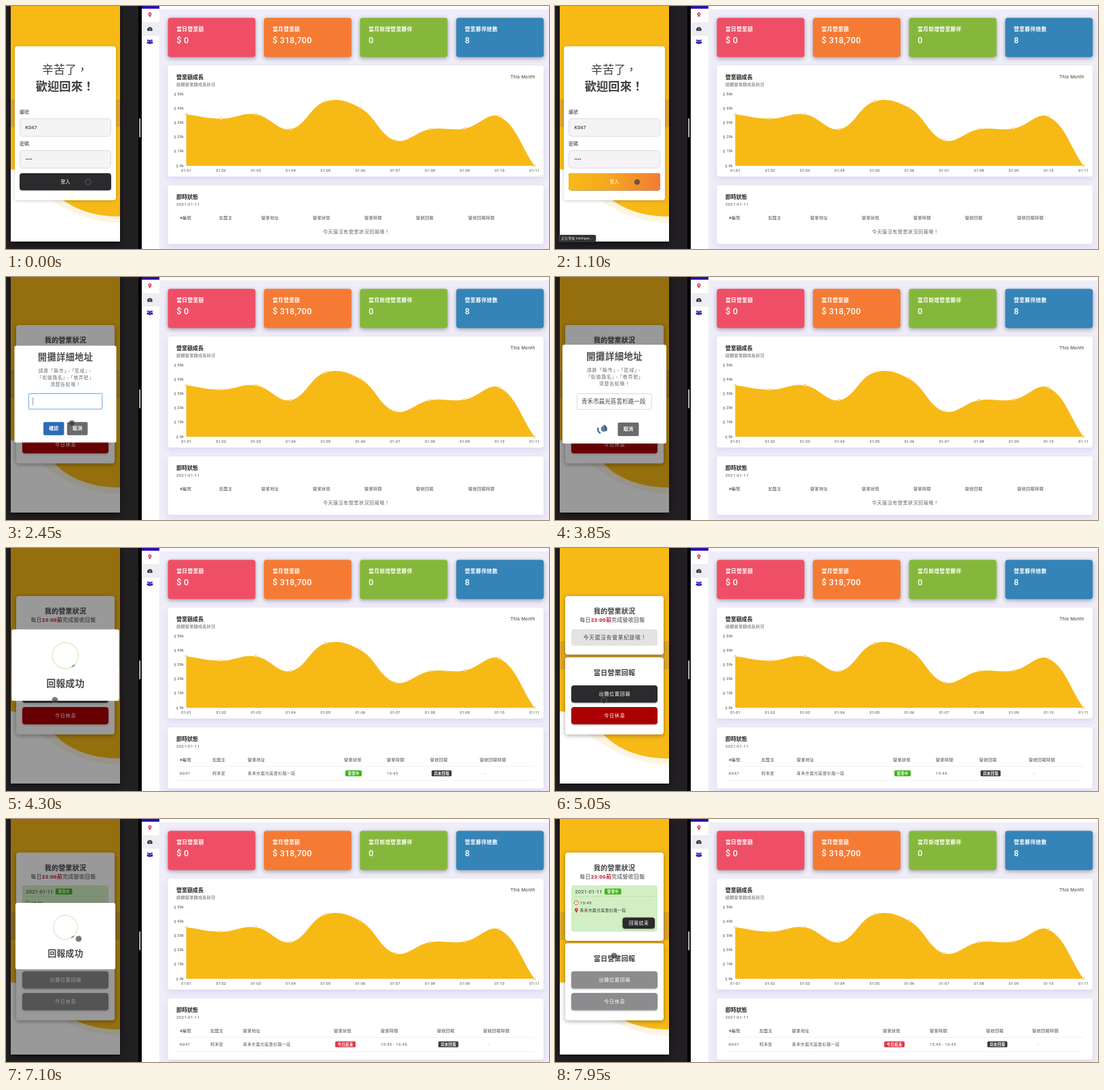
An HTML page with a canvas that plays this animation: 800 px wide and 359 px high, repeating every 8 s.

```html
<!DOCTYPE html>
<html lang="zh-Hant">
<head>
<meta charset="utf-8">
<title>營業回報</title>
<style>
html, body { margin: 0; width: 100%; height: 100%; overflow: hidden; background: #000; }
canvas { display: block; width: 800px; height: 359px; }
</style>
</head>
<body>
<canvas id="stage"></canvas>
<script>
const LOOP = 8000;
const FONT = 'Roboto, "Noto Sans CJK TC", "Noto Sans CJK JP", "Noto Sans CJK", sans-serif';
const MEMBER = { id: 'K047', name: '柯禾安', address: '青禾市晨光區雲杉路一段' };
const DARK = '#2b2a2c', YELLOW = '#f7b916', INK = '#3f3e42';

// moments of the story in ms
const T = {
  press: 500, status: 650, home: 1700, statusEnd: 1800,
  ask: 2174, paste: 2900, send: 3500, open: 4050, done: 4150, doneEnd: 4850,
  report: 5400, closed: 6900, done2: 7000, done2End: 7740
};
const PATH = [[0, 121, 260], [1700, 121, 260], [2120, 97, 216], [2500, 97, 216], [3350, 72, 224],
  [5150, 72, 225], [6450, 123, 154], [6850, 123, 154], [7100, 107, 177], [7900, 87, 202], [8000, 87, 202]];

const canvas = document.getElementById('stage');
const dpr = window.devicePixelRatio || 1;
canvas.width = 800 * dpr;
canvas.height = 359 * dpr;
const c = canvas.getContext('2d');

const clamp = (v, a = 0, b = 1) => Math.min(b, Math.max(a, v));
const mix = (a, b, k) => a + (b - a) * k;

function rect(x1, y1, x2, y2, fill) {
  c.fillStyle = fill;
  c.fillRect(x1, y1, x2 - x1, y2 - y1);
}

function box(x1, y1, x2, y2, fill, r = 4, stroke) {
  c.beginPath();
  c.roundRect(x1, y1, x2 - x1, y2 - y1, r);
  c.fillStyle = fill;
  c.fill();
  if (stroke) {
    c.shadowColor = 'transparent';
    c.strokeStyle = stroke;
    c.lineWidth = 1;
    c.stroke();
  }
}

function shadowBox(x1, y1, x2, y2, fill, shade, blur, dy) {
  c.save();
  c.shadowColor = shade;
  c.shadowBlur = blur * dpr;
  c.shadowOffsetY = dy * dpr;
  box(x1, y1, x2, y2, fill);
  c.restore();
}

function text(s, x, y, size, color, { weight = 400, align = 'left', gap = 0 } = {}) {
  c.font = `${weight} ${size}px ${FONT}`;
  c.letterSpacing = gap + 'px';
  c.textAlign = align;
  c.textBaseline = 'middle';
  c.fillStyle = color;
  c.fillText(s, align === 'center' ? x + gap / 2 : x, y);
}

const mid = (s, x, y, size, color, weight = 400, gap = 0) =>
  text(s, x, y, size, color, { weight, gap, align: 'center' });

function dot(x, y, r, fill) {
  c.beginPath();
  c.arc(x, y, r, 0, 7);
  c.fillStyle = fill;
  c.fill();
}

function arc(x, y, r, from, to, color, width) {
  c.beginPath();
  c.arc(x, y, r, from, to);
  c.strokeStyle = color;
  c.lineWidth = width;
  c.stroke();
}

function pin(x, y, s, color, hole) {
  c.beginPath();
  c.arc(x, y - s * 0.3, s * 0.7, Math.PI * 0.9, Math.PI * 2.1);
  c.lineTo(x, y + s * 1.1);
  c.fillStyle = color;
  c.fill();
  dot(x, y - s * 0.3, s * 0.26, hole);
}

// ---------- dashboard ----------

const VALUES = [160, 166.5, 160, 182, 141, 150.5, 198.5, 182, 181, 163.5, 236];
const POINTS = VALUES.map((y, i) => ({ x: 265.5 + 51.3 * i, y }));

// control points of a cardinal spline weighted by segment length
const HANDLES = POINTS.map((p, i) => {
  const a = POINTS[i - 1] || p, b = POINTS[i + 1] || p;
  const d1 = Math.hypot(p.x - a.x, p.y - a.y), d2 = Math.hypot(b.x - p.x, b.y - p.y);
  const k1 = 0.4 * d1 / (d1 + d2), k2 = 0.4 * d2 / (d1 + d2);
  const dx = b.x - a.x, dy = b.y - a.y;
  const cap = y => clamp(y, 130, 236);
  return { x1: p.x - k1 * dx, y1: cap(p.y - k1 * dy), x2: p.x + k2 * dx, y2: cap(p.y + k2 * dy) };
});

function chart() {
  const shade = 'rgba(90,70,190,.13)';
  shadowBox(238.5, 88, 792, 252, '#fff', shade, 10, 4);
  text('營業額成長', 251, 105.5, 8, '#222', { weight: 700 });
  text('總體營業額成長狀況', 251, 116, 6.2, '#666', { gap: 0.2 });
  text('This Month', 779.5, 105.5, 6.4, '#333', { align: 'right', gap: 0.4 });
  for (let i = 0; i <= 5; i++)
    text(`$ ${i}${i ? 0 : ''}k`, 262, 236 - i * 21.2, 5.3, '#444', { align: 'right', gap: 0.3 });

  c.beginPath();
  c.moveTo(POINTS[0].x, 236);
  c.lineTo(POINTS[0].x, POINTS[0].y);
  for (let i = 1; i < POINTS.length; i++) {
    const a = HANDLES[i - 1], b = HANDLES[i];
    c.bezierCurveTo(a.x2, a.y2, b.x1, b.y1, POINTS[i].x, POINTS[i].y);
  }
  c.fillStyle = YELLOW;
  c.fill();
  POINTS.forEach((p, i) => {
    dot(p.x, p.y, 1.5, '#fff8e0');
    arc(p.x, p.y, 1.5, 0, 7, '#efb526', 0.7);
    mid('01-' + String(i + 1).padStart(2, '0'), p.x, 243, 5.3, '#444', 400, 0.3);
  });
}

const HEADS = ['#編號', '加盟主', '營業地址', '營業狀態', '營業時間', '營收回報', '營收回報時間'];
const COLUMNS = [
  [256, 314, 376, 452, 528, 604, 681],
  [256, 304, 356, 498, 561, 625, 698],
  [256, 301, 349, 483, 552, 635, 703]
];

function tag(s, x, w, y, color) {
  box(x, y - 4.5, x + w, y + 4.2, color, 1.5);
  mid(s, x + w / 2, y, 5.2, '#fff', 700, 0.5);
}

function table(stage) {
  const x = COLUMNS[stage];
  shadowBox(238.5, 265, 792, stage ? 355.5 : 351.5, '#fff', 'rgba(90,70,190,.13)', 10, 4);
  text('即時狀態', 251, 282.5, 8, '#222', { weight: 700 });
  text('2021-01-11', 251, 293, 6.2, '#555', { gap: 0.3 });
  HEADS.forEach((h, i) => text(h, x[i], 313, 6.2, '#4a4a52', { weight: 500, gap: 0.3 }));
  if (!stage) {
    mid('今天還沒有營業狀況回報哦！', 516, 334, 7, '#666', 400, 0.6);
    return;
  }
  rect(251, 322.5, 779, 323, '#e4e4ea');
  rect(251, 343.5, 779, 344, '#e4e4ea');
  const cell = (s, i, dx = 0) => text(s, x[i] + dx, 333, 6.1, '#555', { gap: 0.3 });
  cell(MEMBER.id, 0);
  cell(MEMBER.name, 1);
  cell(MEMBER.address, 2);
  if (stage === 1) tag('營業中', x[3] + 2, 24, 333, '#3db617');
  else tag('今日結束', x[3] + 2, 30, 333, '#e2384c');
  cell(stage === 1 ? '15:45' : '15:45 - 15:45', 4);
  tag('尚未回報', x[5] + 2, 29.5, 333, '#3c3c40');
  cell('-', 6, 7);
}

function sidebar() {
  rect(200, 0, 226, 359, '#fff');
  rect(200, 0, 226, 4, '#2a0fae');
  rect(200, 24, 226, 44, '#eeedf4');
  pin(212, 13, 3.6, '#e33a50', '#fff');
  c.beginPath();
  c.arc(212, 35, 3.8, Math.PI * 0.85, Math.PI * 2.15);
  c.closePath();
  c.fillStyle = '#39383f';
  c.fill();
  rect(211.7, 32.5, 212.4, 36, '#eeedf4');
  for (const dx of [-2.7, 0, 2.7]) {
    const up = dx ? -0.8 : 0;
    dot(212 + dx, 51.6 + up, dx ? 1.2 : 1.6, '#2d1cb5');
    box(210.3 + dx, 53.2 + up, 213.7 + dx, 56.2 + up, '#2d1cb5', 1.2);
  }
}

function dashboard(t) {
  rect(226, 0, 800, 359, '#efedf8');
  rect(226, 0, 800, 5, '#fbfbfe');
  sidebar();
  [
    [238.5, '#ef4f66', '當日營業額', '$ 0'],
    [380, '#f57b35', '當月營業額', '$ 318,700'],
    [521.5, '#85b83a', '當月新增營業夥伴', '0'],
    [663.3, '#3484b7', '營業夥伴總數', '8']
  ].forEach(([x, color, label, value]) => {
    shadowBox(x, 17.5, x + 129, 75.5, color, 'rgba(40,40,60,.4)', 6, 2);
    text(label, x + 12.7, 34.5, 7.7, '#fff', { weight: 700, gap: 0.4 });
    text(value, x + 12.7, 51.5, 12.6, '#fff', { weight: 500, gap: 0.2 });
  });
  chart();
  table(t < T.open ? 0 : t < T.closed ? 1 : 2);
}

// ---------- phone ----------

function wave(bottom, low, x, y, left, color) {
  c.beginPath();
  c.moveTo(7, 0);
  c.lineTo(168, 0);
  c.lineTo(168, bottom);
  c.bezierCurveTo(130, bottom, 95, low, x, y);
  c.bezierCurveTo(x - 17, y - 22, 30, left + 2, 7, left);
  c.fillStyle = color;
  c.fill();
}

function backdrop() {
  rect(7, 0, 168, 348, '#fff');
  wave(320, 308, 50, 276, 243, '#fdf4e2');
  wave(311, 300, 72, 276, 241, YELLOW);
  rect(7, 138, 168, 179, '#dda62a');
}

const card = (y1, y2) => shadowBox(15, y1, 160, y2, '#fff', 'rgba(0,0,0,.35)', 6, 1.5);

function button(y, s, color) {
  shadowBox(24, y, 151, y + 25.5, color, 'rgba(0,0,0,.25)', 3, 1);
  mid(s, 87.5, y + 13, 7.1, '#fff', 400, 0.7);
}

function login(t) {
  shadowBox(13, 59.5, 162, 287, '#fff', 'rgba(0,0,0,.2)', 4, 1);
  mid('辛苦了，', 87, 95, 17, INK);
  mid('歡迎回來！', 87, 120, 17.3, INK, 700);
  [['編號', 157, MEMBER.id], ['密碼', 204, '••••']].forEach(([label, y, value]) => {
    text(label, 20, y, 7, '#333');
    box(20.5, y + 9.5, 154.5, y + 35.5, '#f5f3f6', 4, '#dedce0');
    text(value, 28.5, y + 23, 7.4, '#222');
  });
  box(20, 247, 155, 272.5, DARK);
  const g = c.createLinearGradient(20, 0, 155, 0);
  g.addColorStop(0, '#f7ba18');
  g.addColorStop(0.4, '#f6aa1f');
  g.addColorStop(1, '#f47a35');
  c.globalAlpha = clamp((t - T.press) / 250);
  box(20, 247, 155, 272.5, g);
  c.globalAlpha = 1;
  mid('登入', 87.5, 260, 7, '#fff');
}

function heading(y) {
  mid('我的營業狀況', 87.5, y, 10, INK, 700, 0.2);
  const parts = [['每日', 400, INK], ['23:00前', 700, '#b5122a'], ['完成營收回報', 400, INK]];
  let x = 36.5;
  for (const [s, weight, color] of parts) {
    text(s, x, y + 13, 7.8, color, { weight, gap: 0.4 });
    x += c.measureText(s).width;
  }
}

function home() {
  card(71, 157.5);
  heading(94);
  box(24, 120, 151, 144.5, '#e3e3e4');
  mid('今天還沒有營業紀錄哦！', 88, 132.5, 7.7, '#444', 400, 0.8);
  card(161.5, 275.5);
  mid('當日營業回報', 87.5, 185, 10, INK, 700, 0.2);
  button(203, '出攤位置回報', DARK);
  button(235, '今日休息', '#aa0004');
}

function report() {
  card(49.5, 180);
  heading(73);
  box(24, 98, 151, 166.5, '#d2efc4');
  text('2021-01-11', 29.5, 107.5, 7.2, '#333', { gap: 0.4 });
  tag('營業中', 73, 24.5, 107.2, '#3db617');
  rect(29, 114, 146, 114.6, '#b9d8aa');
  dot(31.5, 123.7, 3, '#fff');
  arc(31.5, 123.7, 3, 0, 7, '#c8643c', 1);
  rect(31.2, 121.8, 31.8, 124, '#555');
  text('15:45', 37, 124, 6, '#333', { gap: 0.4 });
  pin(31.5, 135, 3.4, '#d8202c', '#d2efc4');
  text(MEMBER.address, 36.5, 135.5, 5.9, '#333', { gap: 0.3 });
  shadowBox(99.5, 145.5, 147, 162, DARK, 'rgba(0,0,0,.25)', 3, 1);
  mid('回報結束', 123.3, 154, 6.6, '#fff', 400, 0.7);
  card(183.5, 297.5);
  mid('當日營業回報', 87.5, 207, 10, INK, 700, 0.2);
  button(225, '出攤位置回報', '#8c8b8d');
  button(257, '今日休息', '#8c8b8d');
}

// ---------- dialogs ----------

function popScale(ms) {
  const k = clamp(ms / 300);
  if (k < 0.45) return mix(0.7, 1.05, k / 0.45);
  if (k < 0.8) return mix(1.05, 0.95, (k - 0.45) / 0.35);
  return mix(0.95, 1, (k - 0.8) / 0.2);
}

function dialog(t, start, end, paint) {
  const out = clamp((t - end) / 150);
  const s = popScale(t - start) * mix(1, 0.5, out);
  c.save();
  c.globalAlpha = 1 - out;
  c.translate(87.5, 173);
  c.scale(s, s);
  c.translate(-87.5, -173);
  paint(t - start);
  c.restore();
}

function askBox(t) {
  const sending = t >= T.send;
  box(11, 100, 164, 246, '#fff', 3);
  mid('開攤詳細地址', 87.5, 118, 13.4, '#4a4a4a', 700, 0.4);
  ['請將「縣市」、「區域」、', '「街道路名」、「巷弄號」', '清楚告知哦！'].forEach((s, i) =>
    mid(s, 87.5, 138 + i * 10.2, 7, '#6e6e6e', 400, 0.7));
  if (!sending) box(31, 171, 144, 197, '#d3e4f8', 3);
  box(32.5, 172.5, 142.5, 195.5, '#fff', 2, sending ? '#d9d9d9' : '#8fb6e6');
  if (t >= T.paste) text(MEMBER.address, 39, 184.5, 8.6, '#444');
  else if ((t - T.ask) % 1000 < 500) rect(38.5, 178, 39.2, 190, '#666');
  if (sending) {
    const a = (t - T.send) / 1500 * Math.PI * 2 + 0.5;
    arc(69.5, 225, 6.3, a, a + 1.57, '#2778c4', 2.4);
    arc(69.5, 225, 6.3, a + Math.PI, a + 4.71, '#2778c4', 2.4);
  } else {
    box(54.5, 215, 85.5, 235, '#2a6cb8', 2);
    mid('確認', 70, 225, 7.2, '#fff', 700);
  }
  const x = sending ? 92.5 : 90;
  box(x, 215, x + 31, 235, '#6b6b6b', 2);
  mid('取消', x + 15.5, 225, 7.2, '#fff', 700);
}

function doneBox(ms) {
  box(11, 122, 164, 224, '#fff', 3);
  arc(87.5, 159.5, 18.5, 0, 7, '#dcefd0', 1.6);
  if (ms < 400) arc(87.5, 159.5, 18.5, 0.78, 1.05, '#6fa957', 1.8);
  const tip = clamp((ms - 250) / 150), long = clamp((ms - 400) / 180);
  if (tip) {
    c.beginPath();
    c.moveTo(78, 160.5);
    c.lineTo(78 + 6.5 * tip, 160.5 + 6.5 * tip);
    if (long) c.lineTo(84.5 + 13 * long, 167 - 13 * long);
    c.strokeStyle = '#a5dc86';
    c.lineWidth = 2.2;
    c.lineCap = 'round';
    c.stroke();
    c.lineCap = 'butt';
  }
  mid('回報成功', 87.5, 200, 13.4, '#4a4a4a', 700, 0.2);
}

const fade = (t, a, b) => clamp((t - a) / 100) * (1 - clamp((t - b) / 150));

function phone(t) {
  rect(0, 0, 195, 359, '#211f22');
  rect(195, 0, 200, 359, '#000');
  box(196.2, 166, 198.2, 194, '#c4c4c6', 1);
  shadowBox(7, -5, 168, 348, '#fff', 'rgba(0,0,0,.6)', 8, 2);
  c.save();
  c.beginPath();
  c.rect(7, 0, 161, 348);
  c.clip();
  backdrop();
  if (t < T.home) login(t);
  else if (t < T.report) home();
  else report();
  const dim = 0.4 * Math.max(fade(t, T.ask, T.doneEnd), fade(t, T.done2, T.done2End));
  if (dim > 0) rect(7, 0, 168, 348, `rgba(0,0,0,${dim})`);
  if (t >= T.ask && t < T.done) dialog(t, T.ask, T.done, () => askBox(t));
  if (t >= T.done && t < T.doneEnd + 150) dialog(t, T.done, T.doneEnd, doneBox);
  if (t >= T.done2 && t < T.done2End + 150) dialog(t, T.done2, T.done2End, doneBox);
  c.restore();
  if (t >= T.status && t < T.statusEnd) {
    box(6, 338.5, 60, 348, '#2f2e31', 1.5, '#4a494c');
    text('正在等候 intelligeo...', 9, 343.5, 5.1, '#ddd');
  }
}

function pointer(t) {
  const i = PATH.findIndex(p => p[0] > t);
  const [t0, x0, y0] = PATH[i - 1], [t1, x1, y1] = PATH[i];
  const k = (t - t0) / (t1 - t0), e = k * k * (3 - 2 * k);
  const x = mix(x0, x1, e), y = mix(y0, y1, e);
  dot(x, y, 4, 'rgba(45,45,48,.65)');
  arc(x, y, 4.2, 0, 7, 'rgba(125,125,128,.7)', 0.9);
}

const begin = performance.now();
function draw(now) {
  const t = Math.max(0, now - begin) % LOOP;
  c.setTransform(dpr, 0, 0, dpr, 0, 0);
  dashboard(t);
  phone(t);
  pointer(t);
  requestAnimationFrame(draw);
}
draw(begin);
</script>
</body>
</html>
```
